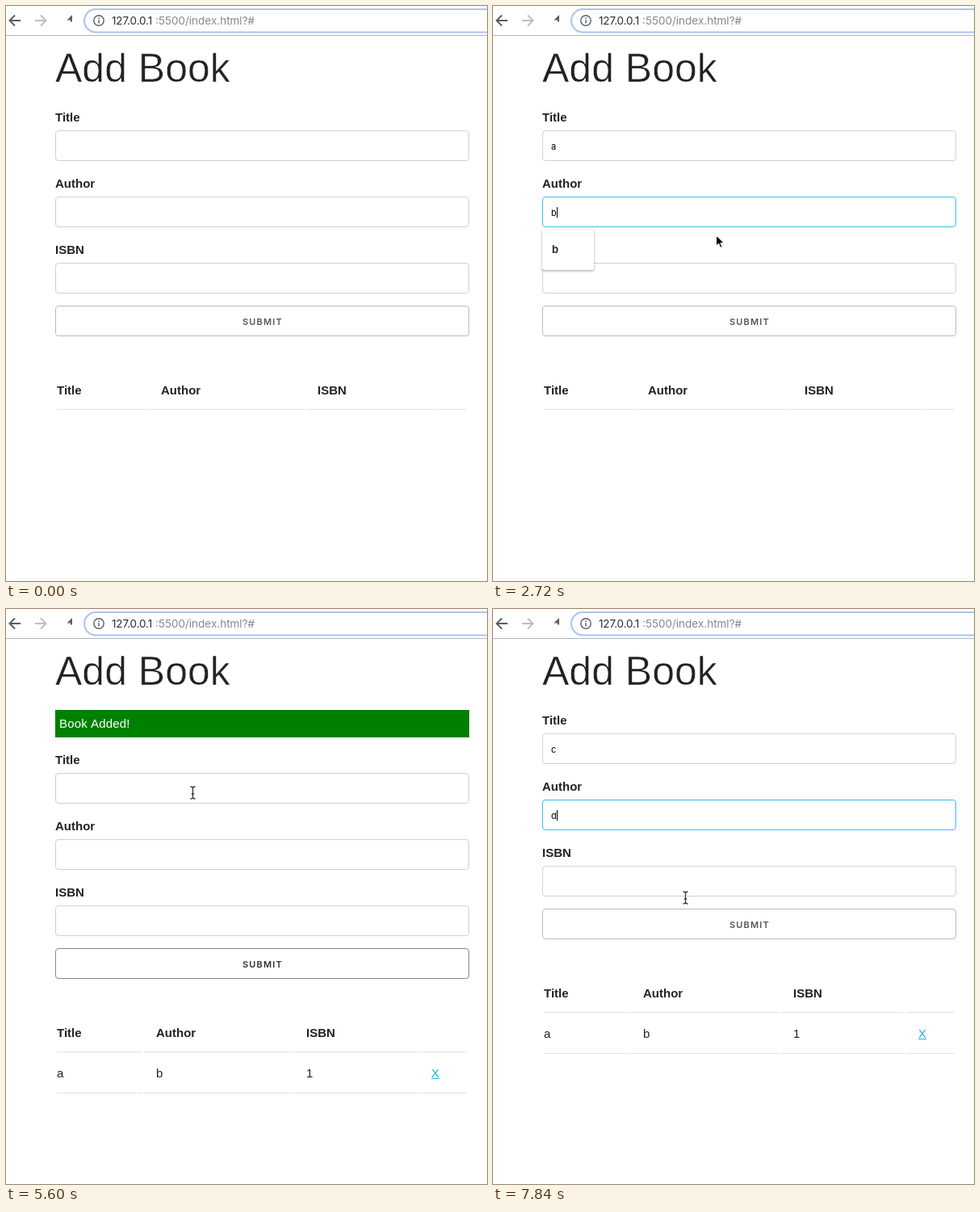
An HTML page with a canvas that plays this animation: 596x712 px, repeating every 8000 ms.

```html
<!DOCTYPE html>
<html lang="en">
<head>
<meta charset="utf-8">
<title>Add Book</title>
<style>
  html, body { margin: 0; width: 100%; height: 100%; overflow: hidden; background: #fff; }
  canvas { display: block; }
</style>
</head>
<body>
<canvas id="stage" width="596" height="712"></canvas>
<script>
const ctx = document.getElementById('stage').getContext('2d');
const LOOP = 8000, TICK = 160;
const SANS = '"Liberation Sans", Arial, sans-serif';
const UI = 'Inter, Roboto, sans-serif';
const LEFT = 61, RIGHT = 574, ALERT_SHIFT = 49;
const FIELD_TOPS = [154, 236, 318], FIELD_H = 38, BUTTON_TOP = 371;
const BUTTON = 3;

const TITLES = { w: 97, items: ['a', 'Title 1', 'c', 'hej', 'Titel 1'] };
const AUTHORS = { w: 132, items: ['b', 'Author 1', 'e', 'hej', 'Författare 1'] };
const NUMBERS = { w: 84, items: ['1', '123', 'c', '3', '1234'] };
const only = s => ({ w: 64, items: [s] });

const START = { values: ['', '', ''], focus: -1, caret: false, list: null, alert: false, row: false };
const STEPS = [
  [1440, { focus: 0, list: TITLES, caret: true }],
  [1760, { values: ['a', '', ''], list: only('a') }],
  [2080, { caret: false }],
  [2240, { focus: 1, list: AUTHORS, caret: true }],
  [2560, { values: ['a', 'b', ''], list: only('b') }],
  [3040, { caret: false }],
  [3360, { focus: 2, list: null, caret: true }],
  [3520, { list: NUMBERS }],
  [4160, { values: ['a', 'b', '1'], list: { w: 84, items: ['1', '123', '1234'] } }],
  [4480, { caret: false }],
  [4800, { values: ['', '', ''], focus: BUTTON, list: null, alert: true, row: true }],
  [5760, { focus: 0, list: TITLES, caret: true }],
  [6240, { values: ['c', '', ''], list: only('c') }],
  [6400, { caret: false }],
  [7200, { focus: 1, list: AUTHORS, caret: true }],
  [7680, { values: ['c', 'd', ''], list: null }],
  [7840, { alert: false }]
];

// Pointer path: time, x, y
const PATH = [
  [160, 248, 206], [320, 262, 180], [480, 294, 191], [640, 294, 191],
  [960, 274, 170], [1120, 277, 165], [1760, 277, 165], [2080, 278, 255],
  [2560, 278, 255], [3040, 272, 338], [4320, 272, 338], [4640, 288, 397],
  [4800, 288, 397], [5120, 255, 260], [5280, 236, 212], [5440, 230, 204],
  [5600, 231, 227], [6560, 231, 227], [7040, 237, 303], [7680, 237, 303],
  [7840, 238, 357]
];

function stateAt(t) {
  return Object.assign({}, START, ...STEPS.filter(s => s[0] <= t).map(s => s[1]));
}

function pointerAt(t) {
  if (t < PATH[0][0]) return null;
  const i = PATH.findIndex(p => p[0] > t);
  if (i < 0) return PATH[PATH.length - 1].slice(1);
  const [t0, x0, y0] = PATH[i - 1], [t1, x1, y1] = PATH[i];
  const k = (t - t0) / (t1 - t0);
  return [Math.round(x0 + (x1 - x0) * k), Math.round(y0 + (y1 - y0) * k)];
}

function text(s, x, y, font, color, spacing = 0) {
  ctx.font = font;
  ctx.letterSpacing = spacing + 'px';
  ctx.fillStyle = color;
  ctx.fillText(s, x, y);
}

function rect(x, y, w, h, color) {
  ctx.fillStyle = color;
  ctx.fillRect(x, y, w, h);
}

function line(points, color, width) {
  ctx.beginPath();
  points.forEach(([x, y], i) => i ? ctx.lineTo(x, y) : ctx.moveTo(x, y));
  ctx.strokeStyle = color;
  ctx.lineWidth = width;
  ctx.stroke();
}

function outline(y, color) {
  ctx.beginPath();
  ctx.roundRect(LEFT + 0.5, y + 0.5, RIGHT - LEFT - 1, FIELD_H - 1, 3.5);
  ctx.fillStyle = '#fff';
  ctx.fill();
  ctx.strokeStyle = color;
  ctx.lineWidth = 1;
  ctx.stroke();
}

const bold = (s, x, y) => text(s, x, y, 'bold 15px ' + SANS, '#222');

function drawArrow(x, dir, color) {
  line([[x - 7 * dir, 18], [x + 6 * dir, 18]], color, 2);
  line([[x, 11.5], [x + 6.5 * dir, 18], [x, 24.5]], color, 2);
}

function drawToolbar() {
  drawArrow(11, -1, '#5a5d61');
  drawArrow(43, 1, '#bcbec1');

  ctx.beginPath();
  ctx.arc(75, 18, 6, -0.75, -0.75 - Math.PI * 1.75 + 0.2, false);
  ctx.strokeStyle = '#5a5d61';
  ctx.lineWidth = 2;
  ctx.stroke();
  ctx.beginPath();
  ctx.moveTo(82, 11);
  ctx.lineTo(82, 17.5);
  ctx.lineTo(75.5, 17.5);
  ctx.fillStyle = '#5a5d61';
  ctx.fill();

  ctx.beginPath();
  ctx.roundRect(97, 4, 540, 28.5, 14.25);
  ctx.strokeStyle = '#a8c3f6';
  ctx.lineWidth = 2;
  ctx.stroke();

  ctx.beginPath();
  ctx.arc(115, 18, 6.2, 0, Math.PI * 2);
  ctx.strokeStyle = '#5a5d61';
  ctx.lineWidth = 1.4;
  ctx.stroke();
  rect(114.3, 14.4, 1.5, 1.6, '#5a5d61');
  rect(114.3, 17.2, 1.5, 4.2, '#5a5d61');

  text('127.0.0.1', 131, 23, '13.5px ' + UI, '#2b2d30', -0.15);
  text(':5500/index.html?#', 185, 23, '13.5px ' + UI, '#85888c');
  rect(0, 36, 596, 1, '#b4b4b4');
}

function drawField(i, label, s, dy) {
  const y = FIELD_TOPS[i] + dy, value = s.values[i], focused = s.focus === i;
  bold(label, LEFT, y - 11);
  outline(y, focused ? '#33c3f0' : '#d1d1d1');
  text(value, 72, y + 24, '11px ' + UI, '#000');
  if (focused && s.caret) {
    const x = value ? Math.round(72 + ctx.measureText(value).width) : 72;
    rect(x, y + 13, 1, 13, '#000');
  }
}

function drawTable(s, dy) {
  const cols = s.row ? [63, 171, 357, 512, 573] : [63, 177, 371, 534, 573];
  const heads = s.row ? [63, 186, 372] : [63, 192, 386];
  const rule = y => cols.slice(0, 4).forEach((x, i) => rect(x, y, cols[i + 1] - x - 2, 1, '#e1e1e1'));
  ['Title', 'Author', 'ISBN'].forEach((h, i) => bold(h, heads[i], 481 + dy));
  rule(499 + dy);
  if (!s.row) return;
  ['a', 'b', '1'].forEach((v, i) => text(v, heads[i], 531 + dy, '15px ' + SANS, '#222'));
  text('X', 527, 531 + dy, '15px ' + SANS, '#1eaedb');
  rect(527, 532 + dy, 10, 1, '#1eaedb');
  rule(550 + dy);
}

function drawList(s, dy) {
  const y = FIELD_TOPS[s.focus] + dy;
  ctx.save();
  ctx.shadowColor = 'rgba(0,0,0,0.4)';
  ctx.shadowBlur = 3;
  ctx.shadowOffsetY = 1;
  ctx.beginPath();
  ctx.roundRect(61, y + 41, s.list.w - 13 + 13, 36 * s.list.items.length + 14, [0, 0, 3, 3]);
  ctx.fillStyle = '#fff';
  ctx.fill();
  ctx.restore();
  s.list.items.forEach((v, i) => text(v, 73, y + 70 + 36 * i, '600 13px ' + UI, '#1c1c1c', 0.15));
}

function beam() {
  const path = new Path2D('M-3 -7.5Q0 -7.5 0 -5.5Q0 -7.5 3 -7.5M0 -5.5V5.5M-3 7.5Q0 7.5 0 5.5Q0 7.5 3 7.5M-1.7 1.5H1.7');
  ctx.strokeStyle = 'rgba(255,255,255,0.8)';
  ctx.lineWidth = 2.6;
  ctx.stroke(path);
  ctx.strokeStyle = '#333';
  ctx.lineWidth = 1.3;
  ctx.stroke(path);
}

function shape(d, fill, stroke) {
  const path = new Path2D(d);
  ctx.lineJoin = 'round';
  ctx.lineWidth = 1.2;
  ctx.fillStyle = fill;
  ctx.strokeStyle = stroke;
  ctx.fill(path);
  ctx.stroke(path);
}

function hand() {
  shape('M-1.6 1Q-1.6 -0.6 0 -0.6Q1.3 -0.4 1.7 1L2.8 4.8Q4 3.6 5.3 4.9Q6.7 3.9 7.8 5.3' +
    'Q10 4.8 10.3 7Q10.6 10 9.2 12.5V15.5H1.5Q0.5 13 -1.6 11.2L-3.6 8.5Q-3.6 6.6 -1.6 7.4L0 8.8Z',
    '#fff', '#333');
  for (const x of [3.4, 5.4, 7.4]) line([[x, 9], [x, 12.5]], '#444', 0.9);
}

function arrow() {
  shape('M0 0V14L3.2 11L5.3 16L7.7 15L5.6 10.2H10Z', '#000', '#fff');
}

function drawPointer([x, y], dy, overButton) {
  const overField = FIELD_TOPS.some(f => y >= f + dy && y <= f + dy + FIELD_H + 2);
  ctx.save();
  ctx.translate(x + 0.5, y + 0.5);
  (overButton ? hand : overField ? beam : arrow)();
  ctx.restore();
}

function draw(t) {
  const s = stateAt(t), pointer = pointerAt(t), dy = s.alert ? ALERT_SHIFT : 0;
  const top = BUTTON_TOP + dy;
  const overButton = !!pointer && pointer[1] >= top && pointer[1] < top + FIELD_H;
  const active = overButton || s.focus === BUTTON;

  rect(0, 0, 596, 712, '#fff');
  drawToolbar();

  text('Add Book', 61, 94, '50px ' + SANS, '#222');
  // Thin the heading to a lighter weight
  ctx.strokeStyle = '#fff';
  ctx.lineWidth = 0.6;
  ctx.strokeText('Add Book', 61, 94);

  if (s.alert) {
    rect(LEFT, 125, RIGHT - LEFT, 34, '#008000');
    text('Book Added!', 66, 147, '15px ' + SANS, '#fff', 0.15);
  }
  ['Title', 'Author', 'ISBN'].forEach((label, i) => drawField(i, label, s, dy));
  outline(top, active ? '#888' : '#bbb');
  text('SUBMIT', 293, top + 24, '600 11px ' + UI, active ? '#333' : '#555', 1.15);
  drawTable(s, dy);
  if (s.list) drawList(s, dy);
  if (pointer) drawPointer(pointer, dy, overButton);
}

const begin = performance.now();
function frame() {
  const t = (performance.now() - begin) % LOOP;
  draw(Math.floor(t / TICK) * TICK);
  requestAnimationFrame(frame);
}
frame();
</script>
</body>
</html>
```
